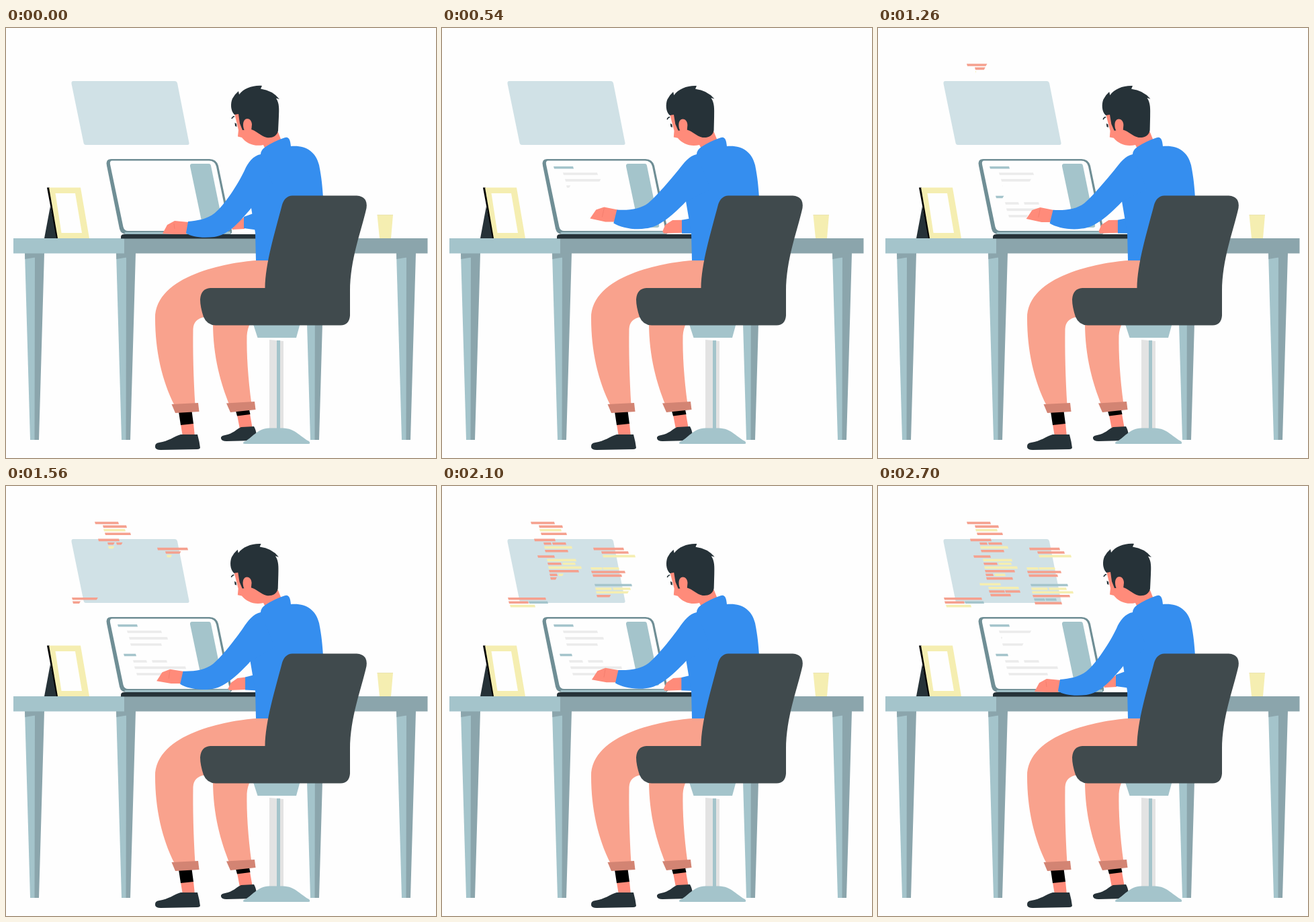
Animation of 640x640 px, one loop 2.73 s. Source, as an HTML page with a canvas:

```html
<!DOCTYPE html>
<html lang="en">
<head>
<meta charset="utf-8">
<title>Working at a desk</title>
<style>
  html, body { margin: 0; width: 100%; height: 100%; overflow: hidden; background: #fefefe; }
  canvas { display: block; }
</style>
</head>
<body>
<canvas width="640" height="640"></canvas>
<script>
const ctx = document.querySelector('canvas').getContext('2d');
const LOOP = 2730, TYPE_MS = 160, ROW_MS = 67;
const TEAL = '#a4c4cb', STEEL = '#8ba5ac', INK = '#263238', SKIN = '#ff8b7a', SHIRT = '#358eef',
  PANTS = '#f9a28d', CUFF = '#d38473', CREAM = '#f5eeb1', SALMON = '#f5a08e', GREY = '#ebebeb';
const INKS = { S: SALMON, Y: CREAM, T: TEAL };

const clamp = v => Math.max(0, Math.min(1, v));
const fill = (color, d) => { ctx.fillStyle = color; ctx.fill(new Path2D(d)); };
const line = (color, width, d) => {
  ctx.strokeStyle = color;
  ctx.lineWidth = width;
  ctx.stroke(new Path2D(d));
};

// Blend two paths that share the same commands.
function mix(a, b, k) {
  const ends = b.match(/[\d.]+/g);
  let i = 0;
  return a.replace(/[\d.]+/g, v => +v + (ends[i++] - v) * k);
}

// A slanted dash that is typed from left to right.
function dash(color, y, x1, x2, p) {
  if (p <= 0) return;
  const x = x1 + (x2 - x1) * clamp(p), tilt = p < 1 ? -2 : 1;
  fill(color, `M${x1} ${y - 1.8}H${x}L${Math.max(x1 + 1, x + tilt)} ${y + 1.8}H${x1 + 1}Z`);
}

// Screen rows: colour, y, segments, times at which the row is typed anew.
const screenRows = [
  [TEAL, 207.7, [166, 195], [60, 801, 2335]],
  [GREY, 217, [180, 231], [200, 848, 1730, 2210, 2550]],
  [GREY, 226.6, [183, 240], [391, 1135, 1860, 2695]],
  [GREY, 236, [185, 231], [519, 1260, 1720, 2591]],
  [TEAL, 251.5, [175, 193], [600, 1151, 2196]],
  [GREY, 261, [189, 209, 217, 239], [640, 2290]],
  [GREY, 270.4, [191, 267], [726, 1160, 2260]],
  [GREY, 280, [194, 252], [793, 1180, 2335]]
];

// Floating code: start time, then rows of "y ink x1 x2 [ink x1 x2]".
const codeBlocks = [
  [1122, `55 S 132 167,60.4 S 144 179,65.8 Y 145 177,71.3 S 147 185,80.4 S 137 168,
    85.8 S 151 162 S 164 184,91.4 Y 152 193,96.7 S 153 187,105 S 142 167,110.4 Y 156 199,
    115.8 S 157 177 Y 179 198,121.4 Y 158 207,126.8 S 159 203,132.2 S 160 171 Y 173 189,
    137.6 S 161 200,146.3 Y 151 182,151.7 Y 164 209,157 S 165 188 S 189 211,162.4 S 167 197`],
  [1400, `93.6 S 225 270,99 S 237 277,104.4 Y 239 287,122.8 Y 221 238 Y 239 263,
    128 S 222 272,133.4 S 224 267`],
  [1838, `147.5 T 227 282,153 Y 228 252 Y 254 280,158.3 Y 229 290,163.7 S 230 285,
    169 T 232 248 T 249 265,174.4 S 233 273`],
  [1450, `167.7 S 98 154,173.2 S 99 128 T 129 157,178.6 Y 101 138`]
].map(([start, rows]) => [start, rows.split(',').map(r => r.trim().split(' '))]);

function drawCode(t) {
  fill('#d0e1e6', 'M100 79H251Q254 79 255 82L272.500 171Q273 174 270 174H119Q116 174 115.500 171L97.500 83Q97 79 100 79Z');
  for (const [start, rows] of codeBlocks) {
    rows.forEach(([y, ...parts], i) => {
      const p = (t - start - i * ROW_MS) / TYPE_MS, pair = parts.length > 3;
      for (let n = 0; n < parts.length; n += 3)
        dash(INKS[parts[n]], +y, +parts[n + 1], +parts[n + 2], pair ? p * 1.5 - n / 6 : p);
    });
  }
}

function drawLaptop(t) {
  fill('#6f8e95', 'M156 195H303Q313 195 316 205L336 301Q337 307 332 307H180Q171 307 169 299L150 205Q148 195 156 195Z');
  fill(TEAL, 'M176 304L178 306.500H334V303Z');
  fill('#fefefe', 'M158 197.500H302Q311 197.500 313 206L332 298Q333 302 329 302H182Q176 302 174.500 296L155 203Q154 197.500 158 197.500Z');
  fill(TEAL, 'M277 202H302Q304.500 202 305 205L323 293Q324 297 320 297H296Q293 297 292.500 294L274 206Q273.500 202 277 202Z');
  for (const [color, y, seg, starts] of screenRows) {
    const p = (t - (starts.findLast(s => s <= t) ?? LOOP)) / TYPE_MS;
    for (let n = 0; n < seg.length; n += 2)
      dash(color, y, seg[n], seg[n + 1], seg.length > 2 ? p * 1.5 - n / 4 : p);
  }
}

function drawDesk() {
  for (const x of [0, 136, 417, 553]) {
    ctx.save();
    ctx.translate(x, 0);
    fill(TEAL, 'M28 335H43V613H36Z');
    fill(STEEL, 'M43 335H57L49 613H42.500ZM28 335H43V341.500L28.300 344Z');
    ctx.restore();
  }
  fill(TEAL, 'M11 313H176V335.500H11Z');
  fill(STEEL, 'M176 313H627.500V335.500H176Z');
  fill(INK, 'M176 307H390V313.500H171V311Q171 307 176 307Z');
  fill(INK, 'M57 313L66 265L76 311L91 313Z');
  fill('#000', 'M61 237.500H65L78 313H75Z');
  fill(CREAM, 'M64 237.500H111L124 313H77Z');
  fill('#fefefe', 'M73.500 246H103L113 305H82.500Z');
  fill(CREAM, 'M552.500 278H576L573 313H556Z');
  line('#e6dfae', 0.7, 'M552.500 278.300H576');
}

function drawHead(k) {
  ctx.save();
  ctx.translate(385, 170);
  ctx.rotate(-0.025 * k);
  ctx.translate(-385, -170);
  fill(SKIN, 'M340 127H360L405 155L410 168L386 180L383 174C370 177 358 172 351 163L345 161.500L346 152Z');
  fill(INK, 'M352 152L348 142L346 128L340 129C334 123 334 112 337 105Q340 99 346 94L347 99C354 90 367 85 381 86L379 90.500Q397 93 407 106L402 104.500C407 112 406.500 121 406 132L405 153C403 162 395 164 388 163C379 161 373 153 365 151Z');
  fill(SKIN, 'M353 144C353 131 366 133 366 144L365 153L356 154Q353 150 353 144Z');
  line(INK, 1.5, 'M336 135Q337 132 340 131.500');
  fill(INK, 'M340.500 141L343 142.500L343.500 147L341 146Z');
  ctx.restore();
}

function drawLegs() {
  fill(SKIN, 'M344 576L363 574L367 597H348ZM260 590L279 588L281 608H263Z');
  fill('#000', 'M342 570L362 568L363.500 575L344 577.500ZM257 571L276.500 570L279 589L260 591Z');
  fill(INK, 'M320 611Q319 607 326 606C338 604 343 597 350 594L369 593Q372 598 373 606Q373 613 368 614L328 615Q321 615 320 611Z');
  fill(INK, 'M222 624Q221 618 228 617C242 615 250 608 260 605L285 605Q288 616 289 625Q288 627 285 627L230 628Q223 628 222 624Z');
  fill(PANTS, 'M308 438C308 490 320 530 333 562L365.500 560C360 520 358 485 358.500 458Q359 448 364 438Z');
  fill(PANTS, 'M390 346H372C330 349 222 368 222 432C222 480 232 525 251 562L281.500 561C279 520 278 480 278.500 448Q279 433 296 430L390 400Z');
  fill(CUFF, 'M328 558.500L370 556L371.500 568L334 572ZM246.500 560L286 558L287.500 571L252 573Z');
}

function drawBody(k) {
  fill(SKIN, mix('M336 298L341 292L348 286L355 281L355 299L337 300Z',
    'M328 303L332 293L343 286L358 286L358 305L330 306Z', k));
  fill(SHIRT, mix('M354 281L368 276L376 301L354 298Z', 'M357 286L368 284L376 306L357 306Z', k));
  drawHead(k);
  fill(SHIRT, mix('M379 188', 'M379 188', k) +
    'Q379 182 386 177Q400 168 414 163.500C421 161 423 166 424 176C446 174 461 184 466 204C470 224 471 238 472 252L440 346H372L371 305' +
    mix('L365 268Z', 'L363 258Z', k));
  fill(SKIN, mix('M233 306L240 293L251 287L272 289L268 307L251 307Z',
    'M220 283L229 270L241 266L261 270L256 288L243 288Z', k));
  line('#f27c6b', 0.8, mix('M250 291L251 299', 'M241 268L238 281', k));
  fill(SHIRT, mix(
    'M379 188C368 190 360 200 355 212C345 233 325 264 310 276C300 284 285 287 271 288L268 305C275 311 292 313 310 311C330 308 345 292 365 268L400 240Z',
    'M379 188C368 190 360 201 352 211C340 225 322 247 307 260C295 269 280 271 260 270L255 290C265 296 285 301 303 298C320 297 340 282 363 258L400 240Z', k));
}

function drawChair() {
  fill('#e3e3e3', 'M392 464L413 466V597H392Z');
  fill(TEAL, 'M403 465H408V597H403ZM368 441H437.500L432 461H374.500Z');
  fill(TEAL, 'M354 616C366 611 374 595.500 392 595.500H412C430 595.500 440 610 451 615Q454 619 450 619H356Q351 619 354 616Z');
  fill('#404a4d', 'M426 249.500H522Q539 251 536.500 268C529 302 512 344 512 392V428Q511 442 498 442.500H312Q299 442 294 430Q289 415 289 404Q290 388 304 387H385.500C386 350 400 305 411 263Q415 250 426 249.500Z');
}

// Reach out and back three times per loop, easing at both ends.
function reach(t) {
  const phase = t * 3 / LOOP % 1, u = 1 - Math.abs(1 - 2 * phase);
  return u < 0.5 ? 4 * u ** 3 : 1 - 4 * (1 - u) ** 3;
}

function frame(now) {
  const t = now % LOOP, k = reach(t);
  ctx.clearRect(0, 0, 640, 640);
  drawCode(t);
  drawLaptop(t);
  drawDesk();
  drawLegs();
  drawBody(k);
  drawChair();
  requestAnimationFrame(frame);
}
requestAnimationFrame(frame);
</script>
</body>
</html>
```
